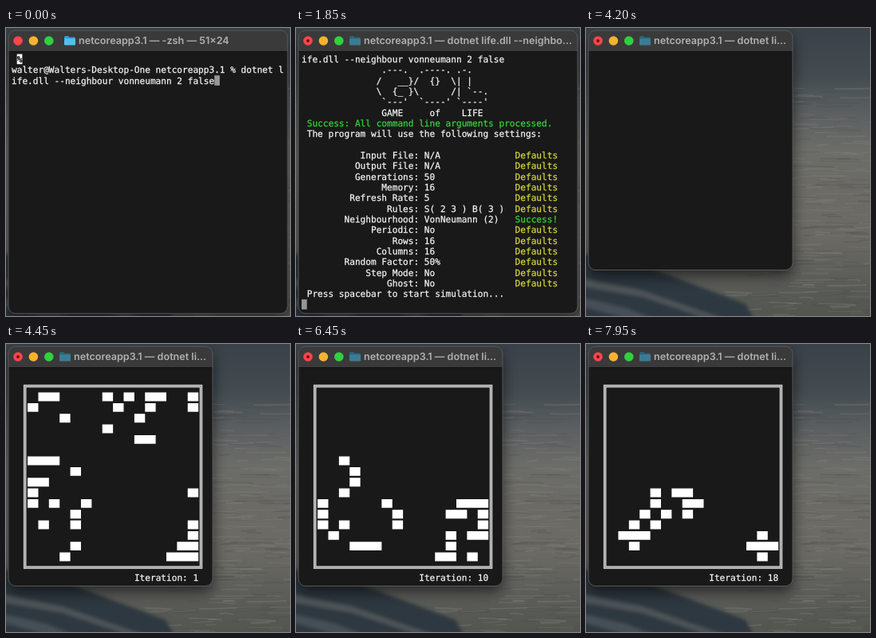
An HTML page for the animation above (8 s loop, 356x360 px).

```html
<!DOCTYPE html>
<html lang="en">
<head>
<meta charset="utf-8">
<title>Life in a terminal</title>
<style>
  html, body { margin: 0; width: 100%; height: 100%; overflow: hidden; background: #30383c; }
  svg { display: block; width: 100vw; height: 100vh; }
  text { white-space: pre; text-rendering: geometricPrecision; }
  .mono { font: 11.11px "DejaVu Sans Mono", monospace; }
  .mono text { stroke: currentColor; stroke-width: .25; }
  .title { font: 600 12.6px Inter, sans-serif; fill: #b0b0b1; }
</style>
</head>
<body>
<svg viewBox="0 0 356 360" preserveAspectRatio="none">
  <defs>
    <linearGradient id="sky" x1="0" y1="0" x2="0" y2="1">
      <stop offset="0" stop-color="#3a4249"/>
      <stop offset=".16" stop-color="#434b50"/>
      <stop offset=".3" stop-color="#5c6061"/>
      <stop offset=".42" stop-color="#6c6c68"/>
      <stop offset=".72" stop-color="#6b6a64"/>
      <stop offset=".86" stop-color="#5d5e5a"/>
      <stop offset="1" stop-color="#53554f"/>
    </linearGradient>
    <filter id="soft" x="-20%" y="-20%" width="140%" height="140%"><feGaussianBlur stdDeviation="2"/></filter>
    <filter id="shade" x="-20%" y="-20%" width="140%" height="140%"><feGaussianBlur stdDeviation="9"/></filter>
    <clipPath id="clip"><rect id="clipBox" x="3" y="3" rx="9"/></clipPath>
  </defs>
  <rect width="356" height="360" fill="url(#sky)"/>
  <g id="streaks" fill="none"></g>
  <g filter="url(#soft)">
    <path d="M-10 280L80 300L200 345L215 372H-10Z" fill="#2e3840"/>
    <path d="M-10 312L70 328L180 366H160L70 336L-10 322Z" fill="#5b6263" opacity=".7"/>
    <path d="M-10 336L50 350L90 366H60L-10 346Z" fill="#596164" opacity=".6"/>
  </g>
  <rect id="shadow" x="3" y="10" rx="9" fill="#000" opacity=".6" filter="url(#shade)"/>
  <g clip-path="url(#clip)">
    <rect width="356" height="360" fill="#191919"/>
    <rect width="356" height="29.5" fill="#3a3a3b"/>
    <rect y="29" width="356" height="1" fill="#101010"/>
  </g>
  <rect id="edge" x="3" y="3" rx="9" fill="none" stroke="#5c5e5f" stroke-width=".9"/>
  <circle cx="15" cy="16" r="5.8" fill="#fb464c"/>
  <circle cx="34.4" cy="16" r="5.8" fill="#f5b32f"/>
  <circle cx="53.8" cy="16" r="5.8" fill="#30d03f"/>
  <circle id="busy" cx="15" cy="16" r="1.9" fill="#6e0d0a"/>
  <g id="head"></g>
  <g id="screen" class="mono"></g>
</svg>
<script>
const LOOP = 8000, ENTER = 950, OUTPUT = 1450, SHRINK = 4150, GRID = 4280, FIRST = 4420, STEP = 205;
const LEFT = 7, CHAR = 6.69, LINE = 13.33, N = 16;
const WHITE = '#f4f4f4', GREEN = '#35d63b', YELLOW = '#d6d63c';
const $ = id => document.getElementById(id);

let state = 11;
const rand = () => (state = state * 16807 % 2147483647) / 2147483647;

const colX = c => LEFT + c * CHAR;
const put = (row, col, str, fill = WHITE, extra = '') =>
  `<text x="${colX(col)}" y="${43 + row * LINE}" fill="${fill}" color="${fill}" ${extra}>${str}</text>`;
const block = (row, col, fill) =>
  `<rect x="${colX(col)}" y="${32.6 + row * LINE}" width="${CHAR}" height="12.6" fill="${fill}"/>`;
const cursor = (row, col) => block(row, col, '#969696');

const COMMAND_END = 'ife.dll --neighbour vonneumann 2 false';

function prompt(running) {
  return block(0, 1, '#fff') + put(0, 1, '%', '#111', 'font-weight="bold"') +
    put(1, 0, 'walter@Walters-Desktop-One netcoreapp3.1 % dotnet l') +
    put(2, 0, COMMAND_END) + (running ? cursor(3, 0) : cursor(2, 38));
}

const LOGO = [
  [15, ".---.  .----. .-."],
  [14, "/   __}/  {}  \\| |"],
  [14, "\\  {_ }\\      /| `--."],
  [15, "`---'  `----' `----'"],
  [15, "GAME     of    LIFE"]
];
const SETTINGS = [
  ['Input File', 'N/A'], ['Output File', 'N/A'], ['Generations', '50'], ['Memory', '16'],
  ['Refresh Rate', '5'], ['Rules', 'S( 2 3 ) B( 3 )'], ['Neighbourhood', 'VonNeumann (2)', 'Success!'],
  ['Periodic', 'No'], ['Rows', '16'], ['Columns', '16'], ['Random Factor', '50%'],
  ['Step Mode', 'No'], ['Ghost', 'No']
];

function settings() {
  let out = put(0, 0, COMMAND_END);
  LOGO.forEach(([col, str], i) => out += put(1 + i, col, str));
  out += put(6, 1, 'Success: All command line arguments processed.', GREEN);
  out += put(7, 1, 'The program will use the following settings:');
  SETTINGS.forEach(([label, value, note], i) => {
    out += put(9 + i, 22 - label.length - 1, label + ':') + put(9 + i, 23, value) +
      put(9 + i, 40, note || 'Defaults', note ? GREEN : YELLOW);
  });
  return out + put(22, 1, 'Press spacebar to start simulation...') + cursor(23, 0);
}

// Live columns of each row in generation 1
const START = [
  [1, 2, 7, 9, 11, 12, 15], [0, 8, 11, 15], [3, 10], [7], [10, 11], [], [0, 1, 2], [4],
  [0, 1], [0, 15], [0, 2, 5], [4], [1, 4, 15], [15], [4, 14, 15], [3, 13, 14, 15]
];
const makeBoard = fn => Array.from({ length: N }, (_, r) => Array.from({ length: N }, (_, c) => fn(r, c)));

// Von Neumann neighbourhood of order 2, survive on 2 or 3, born on 3
function evolve(board) {
  return makeBoard((r, c) => {
    let sum = 0;
    for (let dr = -2; dr <= 2; dr++) {
      const reach = 2 - Math.abs(dr);
      for (let dc = -reach; dc <= reach; dc++) {
        if ((dr || dc) && board[r + dr] && board[r + dr][c + dc]) sum++;
      }
    }
    return sum === 3 || (sum === 2 && board[r][c]);
  });
}

const boards = [makeBoard(() => rand() < 0.5), makeBoard((r, c) => START[r].includes(c))];
while (boards.length < 20) boards.push(evolve(boards[boards.length - 1]));

function grid(n) {
  let d = '';
  boards[n].forEach((row, r) => row.forEach((on, c) => {
    if (on) d += `M${colX(3 + 2 * c)} ${60.6 + r * LINE}h13.4v10.9h-13.4z`;
  }));
  const frame = (color, width) =>
    `<rect x="23.7" y="52.6" width="220.8" height="226.7" fill="none" stroke="${color}" stroke-width="${width}"/>`;
  return frame('#cacaca', 3.6) + frame('#909090', 0.9) +
    `<path d="${d}" fill="#fff"/>` + put(19, 35, 'Iteration: ' + n, WHITE, 'text-anchor="end"');
}

function setWindow(w, h, x, title, busy) {
  for (const id of ['clipBox', 'shadow', 'edge']) {
    $(id).setAttribute('width', w);
    $(id).setAttribute('height', h);
  }
  $('busy').style.display = busy ? '' : 'none';
  const [back, front] = busy ? ['#2b6379', '#3b7c94'] : ['#2f9fd6', '#52c0ee'];
  $('head').innerHTML =
    `<path d="M${x} 11.5q0-1.5 1.5-1.5h3.5l1.5 1.5h6q1.5 0 1.5 1.5v2h-14z" fill="${back}"/>` +
    `<rect x="${x}" y="13.2" width="14" height="8.4" rx="1.3" fill="${front}"/>` +
    `<text class="title" x="${x + 18}" y="20.3">${title}</text>`;
}

function phaseAt(t) {
  if (t < ENTER) return 'idle';
  if (t < OUTPUT) return 'launch';
  if (t < SHRINK) return 'settings';
  if (t < GRID) return 'blank';
  return t < FIRST ? 0 : 1 + Math.floor((t - FIRST) / STEP);
}

let shown = null;
function update(t) {
  const phase = phaseAt(t);
  if (phase === shown) return;
  shown = phase;
  if (phase === 'idle') setWindow(350, 354, 73, 'netcoreapp3.1 — -zsh — 51×24', false);
  else if (t < SHRINK) setWindow(350, 354, 67, 'netcoreapp3.1 — dotnet life.dll --neighbo…', true);
  else setWindow(256, 299.5, 67, 'netcoreapp3.1 — dotnet li…', true);

  $('screen').innerHTML =
    phase === 'idle' ? prompt(false) :
    phase === 'launch' ? prompt(true) :
    phase === 'settings' ? settings() :
    phase === 'blank' ? '' : grid(phase);
}

// Fine ripples on the wallpaper
let ripples = '';
for (let i = 0; i < 260; i++) {
  const x = 170 + rand() * 180, y = 75 + rand() * 285, w = 12 + rand() * 45;
  ripples += `<path d="M${x} ${y}q${w / 2} ${rand() * 3 - 1.5} ${w} ${rand() * 3 - 1.5}" stroke="${rand() < 0.5 ? '#8a8880' : '#4b4d4c'}" stroke-width="${0.7 + rand() * 1.5}" opacity=".28"/>`;
}
$('streaks').innerHTML = ripples;

function tick() {
  update(performance.now() % LOOP);
  requestAnimationFrame(tick);
}
tick();
</script>
</body>
</html>
```
